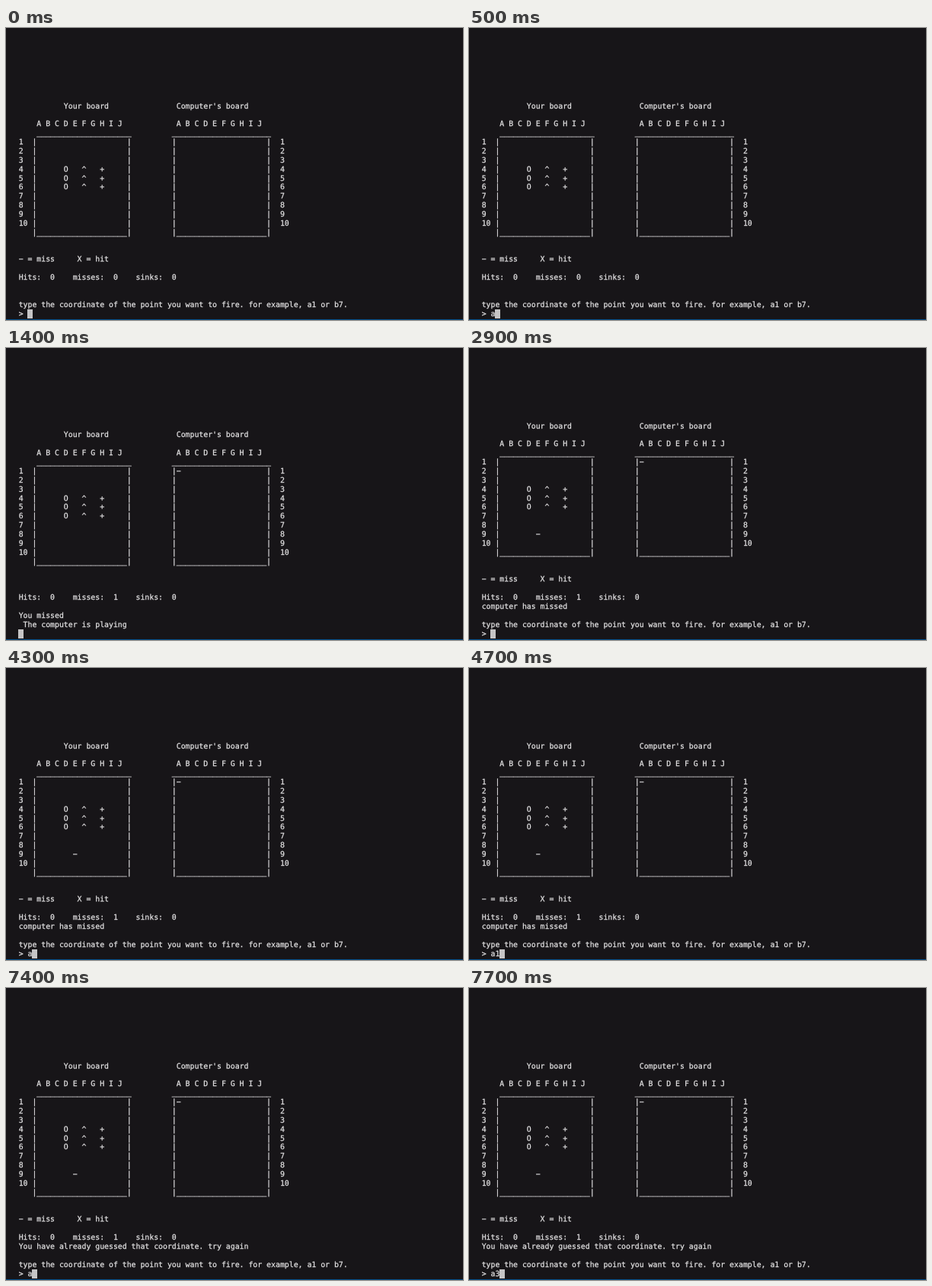
Recreate the animation shown at these times as an HTML page. Size 600x384 px, loop 8000 ms.

```html
<!DOCTYPE html>
<html lang="en">
<head>
<meta charset="utf-8">
<title>Battleship terminal</title>
<style>
html, body { margin: 0; width: 100%; height: 100%; overflow: hidden; background: #171518; }
body::after {
  content: ""; position: absolute; left: 0; bottom: 0;
  width: 100%; height: 1px; background: #04508c;
}
pre {
  position: absolute; left: 16.7px; top: 97.5px; margin: 0;
  font: 9.83px/11.87px "DejaVu Sans Mono", monospace;
  text-rendering: geometricPrecision;
  color: #e4e3e4;
  -webkit-text-stroke: 0.25px;
}
#cursor { background: #c6c5c6; padding: 1px 0.4px 0; margin-left: -0.4px; }
</style>
</head>
<body>
<pre><span id="text"></span><span id="cursor"> </span></pre>
<script>
const LOOP = 8000;
const text = document.getElementById("text");

// Builds one line from alternating columns and strings.
function line(...parts) {
  let s = "";
  for (let i = 0; i < parts.length; i += 2) s = s.padEnd(parts[i]) + parts[i + 1];
  return s;
}

function boards(fired, answered) {
  const letters = "A B C D E F G H I J";
  const rows = [
    line(10, "Your board", 35, "Computer's board"),
    "",
    line(4, letters, 35, letters),
    line(4, "_".repeat(21), 34, "_".repeat(22))
  ];
  for (let n = 1; n <= 10; n++) {
    const ships = n >= 4 && n <= 6 ? line(6, "O", 10, "^", 14, "+")
      : n === 9 && answered ? line(8, "−") : "";
    const shot = n === 1 && fired ? "−" : "";
    rows.push(line(0, n, 3, "|" + ships, 24, "|", 34, "|" + shot, 55, "|", 58, n));
  }
  const floor = "|" + "_".repeat(20) + "|";
  rows.push(line(3, floor, 34, floor));
  return rows;
}

const score = misses => `Hits:  0    misses:  ${misses}    sinks:  0`;

const prompt = (fired, message, typed) => [
  ...boards(fired, fired),
  "", "",
  "− = miss     X = hit",
  "",
  score(fired ? 1 : 0),
  message,
  "",
  "type the coordinate of the point you want to fire. for example, a1 or b7.",
  "> " + typed
];

const waiting = () => [
  "", ...boards(true, false),
  "", "", "",
  score(1),
  "",
  "You missed",
  " The computer is playing",
  ""
];

// The part of a word typed so far, given the time of each key press.
const type = (word, t, ...keys) => word.slice(0, keys.filter(k => t >= k).length);

function screen(t) {
  if (t < 1400) return prompt(false, "", type("a1", t, 500, 900));
  if (t < 2900) return waiting();
  if (t < 5100) return prompt(true, "computer has missed", type("a1", t, 4300, 4700));
  return prompt(true, "You have already guessed that coordinate. try again", type("a3", t, 7400, 7700));
}

const start = performance.now();
function draw() {
  const next = screen((performance.now() - start) % LOOP).join("\n");
  if (text.textContent !== next) text.textContent = next;
  requestAnimationFrame(draw);
}
draw();
</script>
</body>
</html>
```
